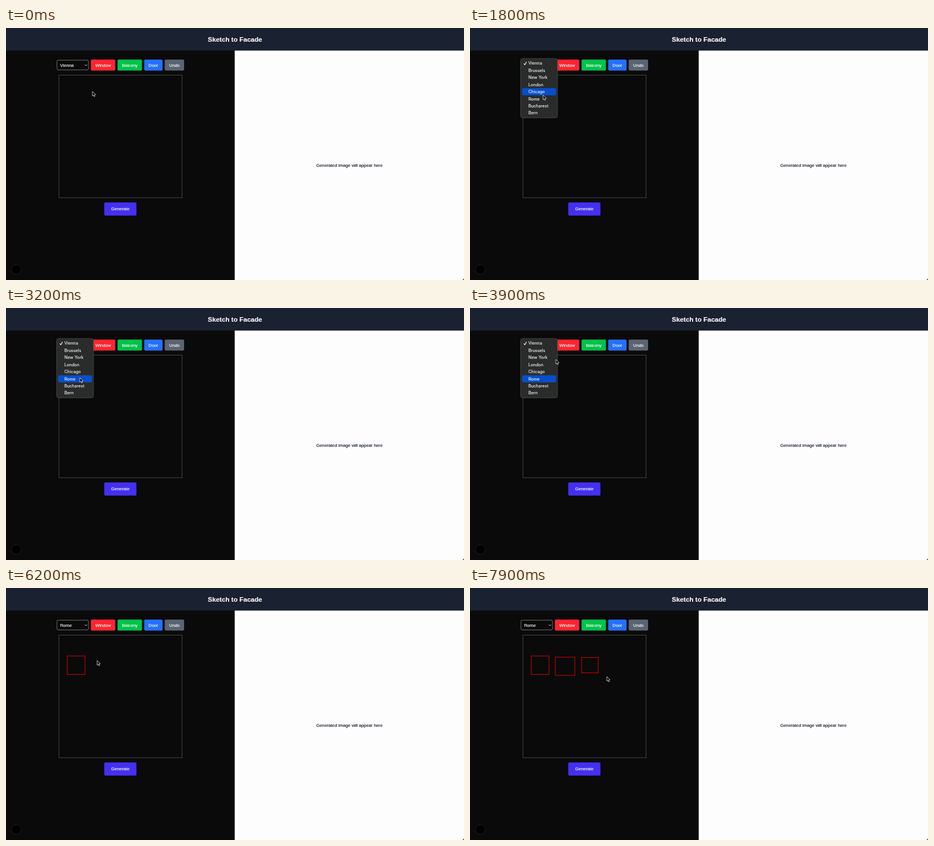
Write an HTML page with a canvas that moves like this. It is 800x441 px and loops after 8 s.

```html
<!DOCTYPE html>
<html lang="en">
<head>
<meta charset="utf-8">
<title>Facade sketch</title>
<style>
html, body { margin: 0; width: 100%; height: 100%; overflow: hidden; background: #0a0a0a; }
canvas { display: block; width: 100vw; height: 100vh; }
</style>
</head>
<body>
<canvas id="stage"></canvas>
<script>
const W = 800, H = 441, LOOP = 8000, STEP = 100;
const SIZE = 7.7, PAD = SIZE, GAP = SIZE / 2;
const SANS = '"Liberation Sans", Arial, sans-serif';
const BODY_FONT = `${SIZE}px ${SANS}`;
const TITLE_FONT = `bold ${SIZE * 1.5}px ${SANS}`;
const MENU_FONT = '7.3px Inter, sans-serif';
const canvas = document.getElementById('stage');
const ctx = canvas.getContext('2d');
const ratio = window.devicePixelRatio || 1;
canvas.width = W * ratio;
canvas.height = H * ratio;

const CITIES = ['Vienna', 'Brussels', 'New York', 'London', 'Chicago', 'Rome', 'Bucharest', 'Bern'];
const ROW = 12.43, FIRST_ROW = 61.8;
const MENU_OPEN = 1200, MENU_LEAVE = 3700, MENU_CLOSE = 4000;
const TOOLS = { Window: '#fd2530', Balcony: '#00c248', Door: '#2470fd', Undo: '#5c6472' };

const ARROW = new Path2D('M0 0V8L1.8 6.4L3 9.1L4.4 8.5L3.2 5.9L5.6 5.7Z');
const CHECK = new Path2D('M94 62.2L95.7 64.3L98.8 59.4');
const CHEVRON = new Path2D('M138.1 64.2L139.7 66L141.3 64.2');
const CORNER = new Path2D(`M${W} ${H - 4}Q${W} ${H} ${W - 4} ${H}H${W}Z`);

// Windows sketched by dragging from one corner to the other
const DRAG = 300;
const WINDOWS = [
  { start: 5400, x: 107, y: 119, w: 31, h: 32.3 },
  { start: 6500, x: 149, y: 121, w: 34, h: 32 },
  { start: 7500, x: 195, y: 121.5, w: 29, h: 27 }
];

const move = (start, end, x, y) => ({ start, end, x, y });
const MOVES = [
  move(0, 100, 151, 116),
  move(300, 1000, 111, 60),
  move(1300, 1900, 129, 122),
  move(MENU_LEAVE, 4100, 171, 58),
  move(4500, 5100, 108.3, 122.7),
  move(5900, 6200, 159.2, 127),
  move(7800, 7900, 239, 155),
  ...WINDOWS.flatMap(({ start, x, y, w, h }) => [
    move(start - DRAG, start, x, y),
    move(start, start + DRAG, x + w, y + h)
  ])
].sort((a, b) => a.start - b.start);

function ease(u) {
  const k = Math.min(1, Math.max(0, u));
  return k * k * (3 - 2 * k);
}

function pointerAt(t) {
  let x = 151, y = 111;
  for (const m of MOVES) {
    const k = ease((t - m.start) / (m.end - m.start));
    x += (m.x - x) * k;
    y += (m.y - y) * k;
  }
  return { x, y };
}

function rect(x, y, w, h, color) {
  ctx.fillStyle = color;
  ctx.fillRect(x, y, w, h);
}

function outline(path, color, width) {
  ctx.strokeStyle = color;
  ctx.lineWidth = width;
  ctx.stroke(path);
}

function fill(path, color) {
  ctx.fillStyle = color;
  ctx.fill(path);
}

function rounded(x, y, w, h, r, color, line) {
  const path = new Path2D();
  path.roundRect(x, y, w, h, r);
  fill(path, color);
  if (line) outline(path, line, 0.8);
}

function text(str, x, y, { color = '#fff', font = BODY_FONT, align = 'left' } = {}) {
  ctx.font = font;
  ctx.textAlign = align;
  ctx.fillStyle = ctx.strokeStyle = color;
  ctx.lineWidth = 0.15;
  ctx.fillText(str, x, y);
  ctx.strokeText(str, x, y);
}

function button(label, x, y, w, h, color) {
  rounded(x, y, w, h, 2, color);
  text(label, x + w / 2, y + h / 2 + 2.7, { align: 'center' });
}

function drawToolbar(city) {
  rounded(89, 56.3, 55, 17, 2, '#0a0a0a', '#8c8c8c');
  text(city, 94.5, 67.7);
  outline(CHEVRON, '#fff', 0.9);

  let x = 148.2;
  for (const [label, color] of Object.entries(TOOLS)) {
    ctx.font = BODY_FONT;
    const w = ctx.measureText(label).width + 2 * PAD;
    button(label, x, 55.2, w, 19.2, color);
    x += w + GAP;
  }
}

function drawPage(city) {
  rect(0, 0, W, H, '#0a0a0a');
  rect(0, 0, W, 39.5, '#1a2130');
  rect(399.5, 39.5, W / 2 + 1, H, '#fdfdfd');
  text('Sketch to Facade', 400, 24.2, { font: TITLE_FONT, align: 'center' });
  text('Generated image will appear here', 600, 243, { color: '#101828', align: 'center' });

  drawToolbar(city);
  button('Generate', 171.6, 305.2, 56.2, 23, '#4430f0');

  ctx.lineWidth = 1;
  ctx.strokeStyle = '#444';
  ctx.strokeRect(92.5, 82.5, 215, 214.5);

  const badge = new Path2D();
  badge.arc(18, 422.5, 8.5, 0, Math.PI * 2);
  fill(badge, '#000');
  outline(badge, '#2c2c2c', 0.7);
  fill(CORNER, '#222');
}

function drawMenu(t) {
  const { y } = pointerAt(Math.min(t, MENU_LEAVE));
  const active = Math.max(0, Math.round((y - FIRST_ROW) / ROW));
  rounded(88.5, 53.4, 64.3, 103.8, 3.5, '#2a2b2b', '#4c4d4d');
  rounded(91, FIRST_ROW + active * ROW - 6.2, 59.5, 12.4, 2.2, '#074fca');
  CITIES.forEach((name, i) =>
    text(name, 102, FIRST_ROW + i * ROW + 2.6, { color: '#f0f0f0', font: MENU_FONT }));
  outline(CHECK, '#fff', 1.1);
}

function drawWindows(t) {
  ctx.strokeStyle = '#c00808';
  ctx.lineWidth = 1.1;
  for (const { start, x, y, w, h } of WINDOWS) {
    const k = ease((t - start) / DRAG);
    if (k > 0) ctx.strokeRect(x, y, w * k, h * k);
  }
}

function drawPointer({ x, y }) {
  ctx.save();
  ctx.translate(x, y);
  ctx.lineJoin = 'round';
  fill(ARROW, '#000');
  outline(ARROW, '#e4e4e4', 0.8);
  ctx.restore();
}

function draw(now) {
  const t = Math.floor((now % LOOP) / STEP) * STEP;
  ctx.setTransform(ratio, 0, 0, ratio, 0, 0);
  drawPage(t < MENU_CLOSE ? 'Vienna' : 'Rome');
  if (t >= MENU_OPEN && t < MENU_CLOSE) drawMenu(t);
  drawWindows(t);
  drawPointer(pointerAt(t));
}

const began = performance.now();
function tick() {
  draw(performance.now() - began);
  requestAnimationFrame(tick);
}
tick();
</script>
</body>
</html>
```
